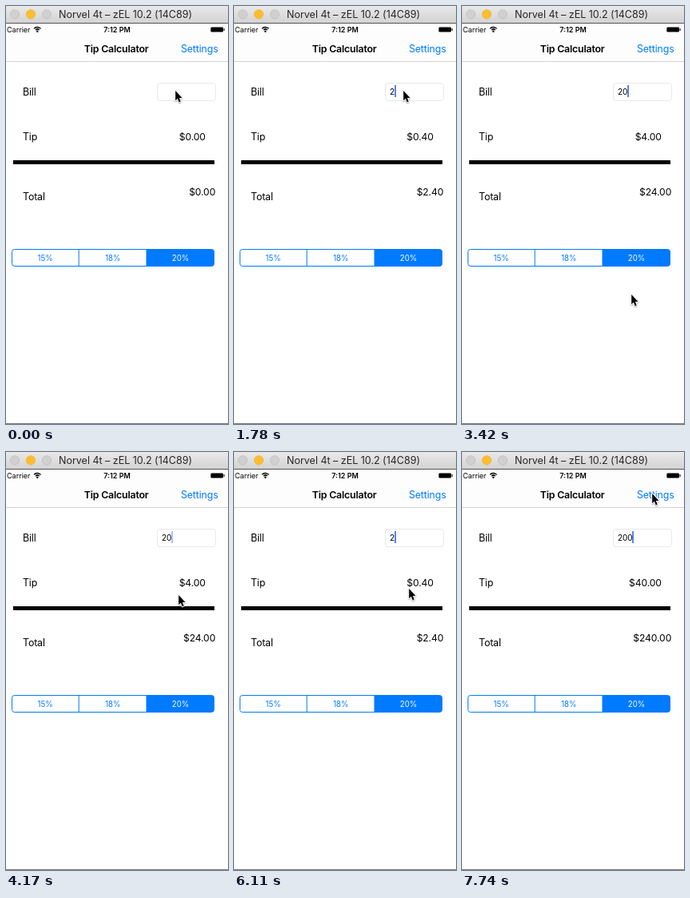
An HTML page with a canvas for the animation above (8 s loop, 278 by 523 pixels).

```html
<!DOCTYPE html>
<html lang="en">
<head>
<meta charset="utf-8">
<title>Tip Calculator</title>
<style>
  html, body { margin: 0; width: 100%; height: 100%; overflow: hidden; background: #fff; }
  canvas { display: block; width: 278px; height: 523px; }
</style>
</head>
<body>
<canvas id="stage"></canvas>
<script>
const W = 278, H = 523, LOOP = 8000;
const BLUE = '#007aff';
const TIP_RATE = 0.2;

// Each track lists [start time, value]; a value holds until the next one.
const billTrack = [
  [0, ''], [1780, '2'], [2230, '20'], [5660, '2'], [5810, ''],
  [6110, '2'], [6410, '20'], [6560, '200']
];
const caretTrack = [[0, 0], [140, 1]];
for (const [fade, back] of [[740, 1190], [2830, 3270], [3870, 4170], [4770, 5210], [7010, 7460]]) {
  caretTrack.push([fade, 0.8], [fade + 140, 0], [back, 0.5], [back + 140, 1]);
}
const pointerTrack = [
  [0, [211, 104]], [3270, [211, 250]], [3420, [211, 359]],
  [3720, [207, 334]], [3870, [203, 270]], [4020, [208, 205]], [4170, [215, 177]], [4320, [218, 169]],
  [7160, [219, 160]], [7310, [224, 126]], [7460, [230, 88]], [7600, [235, 60]], [7740, [237, 50]]
];

const canvas = document.getElementById('stage');
const ctx = canvas.getContext('2d');
const scale = window.devicePixelRatio || 1;
canvas.width = W * scale;
canvas.height = H * scale;

function valueAt(track, t) {
  let value = track[0][1];
  for (const [start, v] of track) if (t >= start) value = v;
  return value;
}

function rect(x, y, w, h, fill) {
  ctx.fillStyle = fill;
  ctx.fillRect(x, y, w, h);
}

function roundRect(x, y, w, h, r) {
  ctx.beginPath();
  ctx.roundRect(x, y, w, h, r);
}

function text(str, x, y, { size = 12.4, color = '#000', weight = 400, align = 'left', track = -0.15 } = {}) {
  ctx.font = `${weight} ${size}px Inter, "Liberation Sans", sans-serif`;
  ctx.letterSpacing = track + 'px';
  ctx.textAlign = align;
  ctx.fillStyle = color;
  ctx.fillText(str, x, y);
}

function drawWindowBar() {
  const shade = ctx.createLinearGradient(0, 0, 0, 21);
  shade.addColorStop(0, '#e9e9e9');
  shade.addColorStop(1, '#d3d3d3');
  rect(0, 0, W, 21, shade);
  rect(0, 21, W, 1, '#555');
  const lights = [['#d0d0d0', '#bdbdbd'], ['#fdbd2e', '#f0b02c'], ['#d0d0d0', '#bdbdbd']];
  lights.forEach(([fill, edge], i) => {
    ctx.beginPath();
    ctx.arc(11 + 20 * i, 10.3, 5.6, 0, Math.PI * 2);
    ctx.fillStyle = fill;
    ctx.fill();
    ctx.strokeStyle = edge;
    ctx.lineWidth = 0.8;
    ctx.stroke();
  });
  text('Norvel 4t – zEL 10.2 (14C89)', 66, 15, { size: 12.6, color: '#262626', track: -0.05 });
}

function drawStatus() {
  rect(0, 22, W, 47, '#fdfdfd');
  rect(0, 69, W, 1, '#d2d2d2');
  text('Carrier', 1, 32.6, { size: 9, track: 0 });
  text('7:12 PM', 139, 32.6, { size: 9, weight: 600, align: 'center', track: 0 });

  ctx.strokeStyle = '#000';
  ctx.lineWidth = 1.3;
  for (const r of [3.2, 5.7]) {
    ctx.beginPath();
    ctx.arc(39.3, 32.2, r, -Math.PI * 0.77, -Math.PI * 0.23);
    ctx.stroke();
  }
  ctx.beginPath();
  ctx.arc(39.3, 31.8, 1.2, 0, Math.PI * 2);
  ctx.fillStyle = '#000';
  ctx.fill();

  roundRect(256.4, 26.4, 15.6, 6.2, 1.3);
  ctx.fill();
  rect(272.6, 28, 1, 3, '#000');
}

function drawSegments() {
  const x = 7.5, y = 304.5, w = 253, h = 21;
  ctx.save();
  roundRect(x, y, w, h, 3);
  ctx.clip();
  rect(175.5, y, 86, h, BLUE);
  rect(90.7, y, 1, h, BLUE);
  ctx.restore();
  roundRect(x, y, w, h, 3);
  ctx.strokeStyle = BLUE;
  ctx.lineWidth = 1;
  ctx.stroke();
  ['15%', '18%', '20%'].forEach((label, i) => {
    text(label, 49.2 + 84.7 * i, 319, {
      size: 9.7, align: 'center', track: 0, color: i === 2 ? '#fff' : BLUE
    });
  });
}

function drawField(bill, caret) {
  roundRect(189.5, 96.5, 73, 22, 3.5);
  ctx.fillStyle = '#fff';
  ctx.fill();
  ctx.strokeStyle = '#e9e9e9';
  ctx.lineWidth = 1;
  ctx.stroke();
  text(bill, 195, 111.2, { size: 10.1 });
  ctx.globalAlpha = caret;
  rect(195.2 + 6 * bill.length, 99, 1.7, 15, '#426bf2');
  ctx.globalAlpha = 1;
}

function drawPointer([x, y]) {
  const outline = [[1.2, 2], [1.2, 14.2], [3.9, 11.8], [5.8, 16.4], [7.7, 15.6], [5.9, 11.1], [9.6, 10.9]];
  ctx.save();
  ctx.translate(x, y);
  ctx.beginPath();
  outline.forEach(([px, py]) => ctx.lineTo(px, py));
  ctx.closePath();
  ctx.lineJoin = 'round';
  ctx.lineWidth = 2;
  ctx.strokeStyle = '#fff';
  ctx.shadowColor = 'rgba(0,0,0,0.4)';
  ctx.shadowBlur = 1.5 * scale;
  ctx.shadowOffsetY = 0.7 * scale;
  ctx.stroke();
  ctx.shadowColor = 'transparent';
  ctx.fillStyle = '#000';
  ctx.fill();
  ctx.restore();
}

function draw(t) {
  const bill = valueAt(billTrack, t);
  const tip = Number(bill) * TIP_RATE;
  const money = n => '$' + n.toFixed(2);
  const figure = { size: 12.2, align: 'right' };

  ctx.setTransform(scale, 0, 0, scale, 0, 0);
  rect(0, 0, W, H, '#fff');
  drawWindowBar();
  drawStatus();
  text('Tip Calculator', 138.1, 57.8, { weight: 600, align: 'center', track: -0.2 });
  text('Settings', 219, 57.8, { color: BLUE });

  text('Bill', 21, 111.9);
  text('Tip', 21, 168.4);
  text('Total', 21, 243.4);
  drawField(bill, valueAt(caretTrack, t));
  text(money(tip), 249.8, 168.3, figure);
  rect(9, 193, 252, 5, '#000');
  text(money(Number(bill) + tip), 262.2, 237.3, figure);
  drawSegments();
  rect(0, 522, W, 1, '#777');
  drawPointer(valueAt(pointerTrack, t));
}

const begin = performance.now();
function tick() {
  draw((performance.now() - begin) % LOOP);
  requestAnimationFrame(tick);
}
tick();
</script>
</body>
</html>
```
